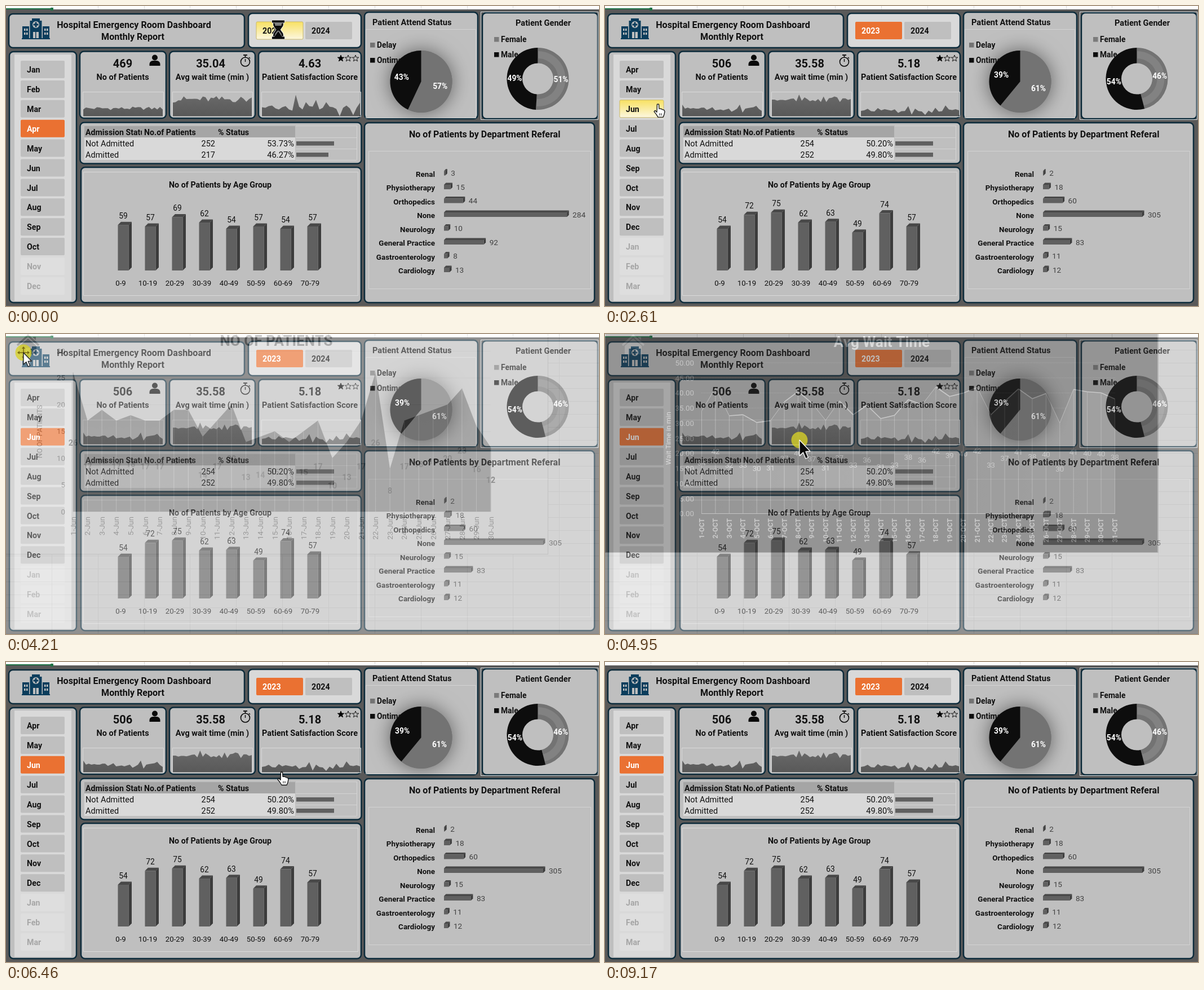
An HTML page with a canvas that plays this animation: 1052x532 px, repeating every 9190 ms.

```html
<!DOCTYPE html>
<html lang="en">
<head>
<meta charset="utf-8">
<title>Hospital dashboard</title>
<style>
html, body { margin: 0; width: 100%; height: 100%; overflow: hidden; background: #fff }
canvas { display: block }
</style>
</head>
<body>
<canvas id="stage" width="1052" height="532"></canvas>
<script>
const W = 1052, H = 532, LOOP = 9190;
const stage = document.getElementById('stage').getContext('2d');
const layer = document.createElement('canvas');
layer.width = W; layer.height = H;
const layerCtx = layer.getContext('2d');
let g = stage;

// ---------- data ----------
const MONTHS = 'Jan Feb Mar Apr May Jun Jul Aug Sep Oct Nov Dec'.split(' ');
const AGES = ['0-9', '10-19', '20-29', '30-39', '40-49', '50-59', '60-69', '70-79'];
const DEPTS = ['Renal', 'Physiotherapy', 'Orthopedics', 'None', 'Neurology', 'General Practice', 'Gastroenterology', 'Cardiology'];

const noise = (i, seed) => { const v = Math.sin(i * 12.9898 + seed * 78.233) * 43758.5453; return v - Math.floor(v); };
const series = (seed, lo, hi, n = 30) => Array.from({ length: n }, (_, i) => lo + (hi - lo) * noise(i, seed));

const octPatients = [15, 14, 15, 18, 19, 15, 15, 10, 19, 12, 20, 18, 20, 11, 10, 14, 11, 25, 17, 22, 18, 16, 14, 13, 15, 18, 10, 15, 18, 16, 20];
const junPatients = [26, 17, 19, 17, 18, 17, 17, 19, 19, 14, 17, 20, 13, 14, 15, 13, 15, 17, 10, 13, 17, 26, 8, 17, 18, 19, 20, 23, 16, 12];
const junWait = [34.6, 34.8, 32.6, 34.2, 34.2, 33.1, 34.7, 36.6, 37.2, 31.3, 45.3, 32.5, 39.5, 36, 31.5, 33.6, 31.6, 35.8, 29.6, 41.2, 29.6, 37.7, 38.5, 41.3, 39.5, 29.7, 37.5, 37.5, 34, 36];
const junScore = [4.75, 5.3, 6.6, 4.5, 4.25, 7.3, 5.2, 6.25, 5.65, 4.95, 6.1, 2.95, 4.45, 4.6, 9, 1.5, 6.75, 4.6, 4.25, 1.3, 4.95, 3.1, 7.45, 4.1, 4.55, 9.6, 6.05, 5.5, 6.25, 5.25];

const bumpy = series(3, 9, 16);
bumpy[11] = 26; bumpy[17] = 18;

const DATA = [
  { kpi: ['469', '35.04', '4.63'], table: [[252, '53.73%', 67], [217, '46.27%', 57]],
    age: [59, 57, 69, 62, 54, 57, 54, 57], dept: [3, 15, 44, 284, 10, 92, 8, 13], deptScale: .768, delay: 57, female: 51,
    sparks: [series(1, 11, 17), series(2, 24, 36),
      [16, 15, 18, 19, 14, 12, 16, 18, 12, 10, 38, 17, 12, 25, 18, 17, 29, 12, 15, 25, 17, 16, 13, 0, 15, 19, 14, 2, 15, 24]] },
  { kpi: ['479', '34.90', '5.30'], table: [[242, '50.52%', 65], [237, '49.48%', 63]],
    age: [70, 67, 64, 60, 42, 53, 71, 52], dept: [4, 11, 45, 263, 11, 115, 12, 18], deptScale: .772, delay: 57, female: 48,
    sparks: [bumpy, series(4, 26, 36),
      [10, 17, 12, 9, 9, 12, 33, 31, 13, 11, 19, 17, 19, 17, 22, 21, 18, 12, 7, 31, 25, 16, 19, 23, 10, 13, 29, 32, 17, 19]] },
  { kpi: ['506', '35.58', '5.18'], table: [[254, '50.20%', 67], [252, '49.80%', 67]],
    age: [54, 72, 75, 62, 63, 49, 74, 57], dept: [2, 18, 60, 305, 15, 83, 11, 12], deptScale: .577, delay: 61, female: 46,
    sparks: [junPatients.map(v => v * .8), junWait.map(v => v * .85), junScore.map(v => v * 2)] }
];

// ---------- drawing helpers ----------
function text(s, x, y, size, { color = '#111', bold = true, align = 'left', turn = 0 } = {}) {
  g.save();
  g.translate(x, y);
  g.rotate(turn);
  g.font = `${bold ? 'bold ' : ''}${size}px Roboto, sans-serif`;
  g.textAlign = align;
  g.fillStyle = color;
  g.fillText(s, 0, size * .36);
  g.restore();
}
function rect(x, y, w, h, color) { g.fillStyle = color; g.fillRect(x, y, w, h); }
function frame(x, y, w, h, color = '#d9d9d9') { g.strokeStyle = color; g.lineWidth = 1; g.strokeRect(x + .5, y + .5, w, h); }
function line(x1, y1, x2, y2, color, width = 1) {
  g.beginPath(); g.moveTo(x1, y1); g.lineTo(x2, y2);
  g.strokeStyle = color; g.lineWidth = width; g.stroke();
}
function poly(points, fill, stroke, width = 1) {
  g.beginPath();
  points.forEach(([x, y]) => g.lineTo(x, y));
  g.closePath();
  if (fill) { g.fillStyle = fill; g.fill(); }
  if (stroke) { g.strokeStyle = stroke; g.lineWidth = width; g.lineJoin = 'round'; g.stroke(); }
}
function round(x, y, w, h, r, fill, stroke, width = 2.5) {
  g.beginPath(); g.roundRect(x, y, w, h, r);
  g.fillStyle = fill; g.fill();
  if (stroke) { g.strokeStyle = stroke; g.lineWidth = width; g.stroke(); }
}
function disc(x, y, r, color) { g.beginPath(); g.arc(x, y, r, 0, 7); g.fillStyle = color; g.fill(); }
const panel = (x1, y1, x2, y2, fill = '#bfbfbf') => round(x1, y1, x2 - x1, y2 - y1, 7, fill, '#0c2b3b');
function gradient(x1, y1, x2, y2, ...colors) {
  const fill = g.createLinearGradient(x1, y1, x2, y2);
  colors.forEach((c, i) => fill.addColorStop(i / (colors.length - 1), c));
  return fill;
}
function plot(values, x1, x2, base, scale) {
  return values.map((v, i) => [x1 + (x2 - x1) * i / (values.length - 1), base - v * scale]);
}
const closed = (pts, base) => [...pts, [pts[pts.length - 1][0], base], [pts[0][0], base]];

// ---------- dashboard ----------
function button(label, x, y, w, { selected, disabled, hover }) {
  const fill = hover ? gradient(0, y, 0, y + 31, '#f8e162', '#fcf7e0')
    : selected ? '#ea7132' : disabled ? '#dedede' : '#bfbfbf';
  round(x, y, w, 31, 2, fill, hover && '#c9b86a', 1);
  text(label, x + 11, y + 16, 14.2, { color: disabled ? '#a6a6a6' : selected && !hover ? '#fff' : '#111' });
}

function hospital() {
  const navy = '#0b3d5c';
  rect(29, 36, 12, 22, navy); rect(65, 36, 12, 22, navy);
  rect(42.5, 26, 21, 32, navy); rect(46, 22, 14, 6, navy);
  rect(28, 57, 50, 2, navy);
  disc(53, 33, 6, '#bfbfbf');
  rect(51.5, 28.5, 3, 9, navy); rect(48.5, 31.5, 9, 3, navy);
  for (const x of [32, 36, 68, 72]) for (const y of [40, 47]) rect(x, y, 2.5, 4, '#bfbfbf');
  rect(48, 46, 10, 11, '#bfbfbf'); rect(52, 46, 1.5, 11, navy);
}

function star(cx, cy, filled) {
  const pts = Array.from({ length: 10 }, (_, i) => {
    const a = i * Math.PI / 5, r = i % 2 ? 2.5 : 6;
    return [cx + r * Math.sin(a), cy - r * Math.cos(a)];
  });
  poly(pts, filled && '#000', '#000', .9);
}

function kpiIcons() {
  disc(264, 91.5, 5, '#0a0a0a');
  round(254.5, 97, 19, 9, [6, 6, 0, 0], '#0a0a0a');
  g.beginPath(); g.arc(424.5, 99, 8, 0, 7);
  g.strokeStyle = '#0a0a0a'; g.lineWidth = 1.6; g.stroke();
  line(424.5, 99, 424.5, 94, '#0a0a0a', 1.4);
  line(421, 87, 428, 87, '#0a0a0a', 1.8);
  line(424.5, 87, 424.5, 91, '#0a0a0a', 1.6);
  line(431, 91, 433, 93, '#0a0a0a', 1.5);
  [594, 607, 620].forEach((x, i) => star(x, 93, !i));
}

function slice(cx, cy, r, from, to, color, inner = 0) {
  const a = from * 2 * Math.PI - Math.PI / 2, b = to * 2 * Math.PI - Math.PI / 2;
  g.beginPath();
  g.arc(cx, cy, r, a, b);
  if (inner) g.arc(cx, cy, inner, b, a, true); else g.lineTo(cx, cy);
  g.closePath();
  g.fillStyle = color; g.fill();
}
function shareLabel(cx, cy, r, at, pct) {
  const a = at * 2 * Math.PI;
  text(pct + '%', cx + r * Math.sin(a), cy - r * Math.cos(a), 13.8, { color: '#fff', align: 'center' });
}
function legend(x, y, color, label) {
  rect(x, y - 4, 8.5, 8.5, color);
  text(label, x + 12, y, 13.8);
}

function pies({ delay, female }) {
  panel(636, 11, 837, 200);
  frame(638, 41, 195, 157, '#d2d2d2');
  text('Patient Attend Status', 650, 29, 14.6);
  legend(646, 69, '#737373', 'Delay');
  legend(646, 96, '#0d0d0d', 'Ontime');
  g.save();
  g.shadowColor = 'rgba(0,0,0,.5)'; g.shadowBlur = 34;
  disc(736.5, 134, 55, '#737373');
  g.restore();
  const d = delay / 100, f = female / 100;
  slice(736.5, 134, 55, 0, d, '#737373');
  slice(736.5, 134, 55, d, 1, '#0d0d0d');
  shareLabel(736, 134, 35, d / 2, delay);
  shareLabel(736, 134, 35, (1 + d) / 2, 100 - delay);

  panel(845, 12, 1050, 200);
  frame(842, 10, 208, 191, '#dfe4e6');
  text('Patient Gender', 904, 30, 14.6);
  legend(866, 59, '#7b7b7b', 'Female');
  legend(866, 86, '#0d0d0d', 'Male');
  slice(943.5, 129, 55, 0, f, '#737373', 27.5);
  slice(943.5, 129, 49, 0, f, '#828282', 36);
  slice(943.5, 129, 55, f, 1, '#0d0d0d', 27.5);
  shareLabel(943.5, 129, 41, f / 2, female);
  shareLabel(943.5, 129, 41, (1 + f) / 2, 100 - female);
}

function block(x, y, w, h, depth) {
  poly([[x, y], [x + depth, y - depth], [x + w + depth, y - depth], [x + w, y]], '#484848');
  poly([[x + w, y], [x + w + depth, y - depth], [x + w + depth, y + h - depth], [x + w, y + h]], '#3c3c3c');
  rect(x, y, w, h, '#606060');
}

function barCharts({ age, dept, deptScale }) {
  panel(133, 286, 630, 526);
  frame(137, 294, 487, 219);
  text('No of Patients by Age Group', 380, 317, 14.3, { align: 'center' });
  age.forEach((v, i) => {
    const x = 198.5 + 48 * i, h = v * 1.37;
    block(x, 469 - h, 19, h, 5.5);
    text(v, x + 9.5, 453 - h, 13.8, { bold: false, align: 'center' });
    text(AGES[i], x + 5, 491, 13.3, { bold: false, align: 'center' });
  });

  panel(636, 207, 1044, 526);
  frame(643, 257, 394, 244, '#d2d2d2');
  text('No of Patients by Department Referal', 715, 227, 16);
  dept.forEach((v, i) => {
    const y = 297.5 + 24.5 * i, w = v * deptScale;
    block(777, y - 5, w, 8, 3.5);
    text(DEPTS[i], 761, y + .5, 13.4, { align: 'right' });
    text(v, 787 + w, y - 1, 13.6, { bold: false, color: '#404040' });
  });
}

function sparkline(heights, x, w) {
  poly(closed(plot(heights, x, x + w, 195.5, 1), 195.5), gradient(0, 165, 0, 196, '#666', '#585858'));
  frame(x - 1, 152, w + 2, 44, '#dadada');
}

function admissions(table) {
  panel(131.5, 206.5, 630.5, 279.5);
  rect(139, 233, 374, 40, '#d9d9d9');
  rect(139, 213, 374, 20, '#a5a5a5');
  g.save();
  g.beginPath(); g.rect(139, 210, 102, 26); g.clip();
  text('Admission Status', 141, 224, 14.2);
  g.restore();
  text('No.of Patients', 245, 224, 14.2);
  text('% Status', 376, 224, 14.2);
  for (const y of [212, 233, 253, 273]) line(514, y + .5, 622, y + .5, '#d4d4d4');
  line(622.5, 212, 622.5, 273, '#d4d4d4');
  table.forEach(([count, pct, width], i) => {
    const y = 244 + 20 * i;
    text(i ? 'Admitted' : 'Not Admitted', 141, y, 14.5, { bold: false });
    text(count, 371, y, 14.5, { bold: false, align: 'right' });
    text(pct, 511, y, 14.7, { bold: false, align: 'right' });
    rect(515, y - 4, width, 7.5, '#606060');
  });
}

function dashboard(t, pointer) {
  const numbers = DATA[t < 200 ? 0 : t < 2160 ? 1 : 2];
  const charts = DATA[t < 470 ? 0 : t < 2340 ? 1 : 2];
  const over = (x, y, w) => pointer && pointer.x >= x && pointer.x <= x + w && pointer.y >= y && pointer.y <= y + 32;

  rect(0, 0, W, H, '#595959');
  rect(0, 0, W, 6, '#fff');
  for (let i = 1; i <= 12; i++) line(Math.round(i * 81.85) - .5, 0, Math.round(i * 81.85) - .5, 6, '#dcdcdc');
  if (t < 9170) { rect(0, 4, 82, 2, '#1e7145'); rect(79, 3, 5, 5, '#1e7145'); }

  panel(5, 14, 423, 74);
  hospital();
  text('Hospital Emergency Room Dashboard', 227, 33, 16.1, { align: 'center' });
  text('Monthly Report', 225, 54, 16.1, { align: 'center' });

  panel(430, 13, 630, 74, '#d9d9d9');
  button('2023', 444, 28, 83, { selected: true, hover: over(444, 28, 83) });
  button('2024', 531, 28, 83, {});

  panel(6, 81, 125, 526);
  rect(15, 86, 101, 437, '#d9d9d9');
  const shift = t < 200 ? 0 : 3, active = t < 200 ? 10 : 9, month = t < 1220 ? 'Apr' : 'Jun';
  for (let i = 0; i < 12; i++) {
    const name = MONTHS[(i + shift) % 12], y = 97 + 34.9 * i;
    button(name, 26, y, 78, { selected: name === month, disabled: i >= active, hover: over(26, y, 78) });
  }

  const tiles = [[131, 284, 'No of Patients'], [290, 442, 'Avg wait time (min )'], [448, 630, 'Patient Satisfaction Score']];
  tiles.forEach(([x1, x2, label], i) => {
    panel(x1, 80.5, x2, 199);
    const mid = [207, 364, 539][i];
    text(numbers.kpi[i], mid - (i === 1), 102, 20, { align: 'center' });
    text(label, mid + (i === 1 ? 2 : 0), 126, 14.5, { align: 'center' });
    sparkline(charts.sparks[i], x1 + 6, x2 - x1 - (i > 1 ? 8 : 12));
  });
  kpiIcons();
  admissions(numbers.table);
  pies(charts);
  barCharts(charts);
}

// ---------- detail sheets ----------
function house(cx, color, hole) {
  rect(cx + 9, 5, 5, 10, color);
  poly([[cx, 7], [cx + 15, 21], [cx + 15, 36], [cx - 15, 36], [cx - 15, 21]], color);
  g.beginPath(); g.moveTo(cx - 19, 20); g.lineTo(cx, 3); g.lineTo(cx + 19, 20);
  g.strokeStyle = hole; g.lineWidth = 7; g.stroke();
  g.strokeStyle = color; g.lineWidth = 3.6; g.stroke();
  rect(cx - 4, 25, 8, 11, hole);
}

function cells() {
  rect(0, 0, W, H, '#fff');
  for (let i = 1; i <= 12; i++) line(Math.round(i * 81.85) - .5, 0, Math.round(i * 81.85) - .5, H, '#e1e1e1');
  for (let k = 0; k < 24; k++) line(0, Math.round(5 + 22.85 * k) + .5, W, Math.round(5 + 22.85 * k) + .5, '#e1e1e1');
}

function dayLabels(pts, suffix, y, size, style) {
  pts.forEach(([x], i) => text(`${i + 1}-${suffix}`, x, y, size, { ...style, align: 'right', turn: -Math.PI / 2 }));
}
function dropLines(pts, base, color) { pts.forEach(([x, y]) => line(x, y, x, base, color)); }

function patientsSheet(t) {
  const stale = t < 3460, values = stale ? octPatients : junPatients;
  rect(0, 0, 961, 390, '#fff');
  line(961.5, 0, 961.5, 391, '#c8c8c8'); line(0, 390.5, 962, 390.5, '#c8c8c8');
  house(39, '#7f7f7f', '#fff');
  text('NO OF PATIENTS', 479.5, 12, 26, { color: '#505050', align: 'center' });
  text('NO OF PATIENTS', 60, 173, 12.4, { color: '#505050', bold: false, align: 'center', turn: -Math.PI / 2 });
  for (let v = 0; v <= 30; v += 5) {
    const y = 315 - v * 9.5;
    line(119, y + .5, 860, y + .5, '#ebebeb');
    text(v, 105, y, 13.3, { color: '#505050', bold: false, align: 'right' });
  }
  const pts = plot(values, 119, 860, 315, 9.5);
  poly(closed(pts, 315), gradient(0, 80, 0, 315, '#6a6a6a', '#777', '#797979'));
  dropLines(pts, 315, '#b5b5b5');
  pts.forEach(([x, y], i) => text(values[i], x, (y + 315) / 2 + 1, 14.2, { color: '#2c2c2c', align: 'center' }));
  dayLabels(pts, stale ? 'Oct' : 'Jun', 324, 13.3, { color: '#505050', bold: false });
}

function waitSheet(t) {
  const stale = t < 5320, values = stale ? series(8, 30, 42, 31) : junWait;
  rect(0, 0, 982, 388, '#a6a6a6');
  rect(1, 0, 979, 387, '#404040');
  house(50, '#7f7f7f', '#404040');
  text('Avg Wait Time', 491, 14, 26.2, { color: '#dedede', align: 'center' });
  text('Wait Time in min', 112, 185, 12.6, { color: '#d9d9d9', bold: false, align: 'center', turn: -Math.PI / 2 });
  g.setLineDash([1, 1.5]);
  for (let v = 5; v <= 50; v += 5) line(171, 318.5 - v * 5.35, 905, 318.5 - v * 5.35, '#808080');
  g.setLineDash([]);
  for (let v = 0; v <= 50; v += 5) text(v.toFixed(2), 158, 318.5 - v * 5.35, 13.3, { color: '#d0d0d0', bold: false, align: 'right' });
  const pts = plot(values, 171.5, 904.5, 318.5, 5.35);
  poly(closed(pts, 318.5), gradient(171, 0, 905, 0, '#454545', '#575757', '#646464'));
  dropLines(pts, 318.5, '#a8a8a8');
  pts.slice(1).forEach(([x, y], i) => {
    const [px, py] = pts[i];
    line(px, py, x, y, '#dcdcdc', Math.abs(y - py) > 30 ? .8 : 1.6);
  });
  line(171, 318.5, 905, 318.5, '#cfcfcf', 1.2);
  pts.forEach(([x, y], i) => text(Math.round(values[i]), x, (y + 318.5) / 2 + 1, 13.2, { color: '#e0e0e0', bold: false, align: 'center' }));
  dayLabels(pts, stale ? 'OCT' : 'JUN', 327, 12.3, { color: '#dedede' });
}

function scoreSheet(t) {
  const stale = t < 7310, values = stale ? series(9, 2, 8, 31) : junScore;
  const glow = g.createRadialGradient(0, 0, 0, 0, 0, 1);
  glow.addColorStop(0, '#fff'); glow.addColorStop(.3, '#fbfbfb'); glow.addColorStop(1, '#bebebe');
  g.save();
  g.beginPath(); g.rect(0, 0, 983, 401); g.clip();
  g.translate(510, 60); g.scale(580, 470);
  rect(-1, -1, 2, 2, glow);
  g.restore();
  line(982.5, 0, 982.5, 402, '#b0b0b0'); line(0, 401.5, 983, 401.5, '#b0b0b0');
  house(45, '#7f7f7f', '#dcdcdc');
  text('Avg satisfaction Score', 490.5, 12, 26, { color: '#3b3b3b', align: 'center' });
  text('Satisfactiom score', 105, 192, 13, { color: '#3b3b3b', align: 'center', turn: -Math.PI / 2 });
  const pts = plot(values, 165, 902, 330, 22.85);
  for (let v = 0; v <= 12; v += 2) {
    const y = 330 - v * 22.85, shade = 130 + v * 7;
    line(165, y, 902, y, `rgb(${shade},${shade},${shade})`);
    text(v.toFixed(2), 152, y, 13.3, { color: '#3b3b3b', bold: false, align: 'right' });
  }
  poly(closed(pts, 330), 'rgba(122,122,122,.92)', '#d5d5d5', .8);
  line(165, 330, 902, 330, '#404040', 2.5);
  dayLabels(pts, stale ? 'OCT' : 'JUN', 340, 11.8, { color: '#3b3b3b', bold: false });
}

// ---------- pointers ----------
const POINTERS = {
  wait(x, y) {
    const bulb = s => [[x - 8, y + 13 * s], [x + 8, y + 13 * s], [x + 7, y + 7 * s], [x + 2, y], [x - 2, y], [x - 7, y + 7 * s]];
    for (const s of [1, -1]) poly(bulb(s), null, '#fff', 4.5);
    for (const s of [1, -1]) {
      poly(bulb(s), '#7d7d7d', '#0a0a0a', 2.8);
      round(x - 11.5, y + 14.5 * s - 2.5, 23, 5, 1, '#0a0a0a', '#fff', .8);
    }
    poly([[x - 6, y - 7], [x + 6, y - 7], [x, y]], '#0a0a0a');
    poly([[x - 7, y + 13], [x + 7, y + 13], [x, y + 3]], '#0a0a0a');
  },
  hand(x, y) {
    const shape = [[-1.5, 0], [1.5, 0], [2, 8], [5, 8], [8, 9.5], [11, 10.5], [12, 13], [11, 18], [9, 23], [0, 23], [-3, 18], [-7, 13], [-5, 11], [-2, 14]];
    poly(shape.map(([a, b]) => [x + a, y + b]), '#fff', '#111', 1.3);
    for (const a of [3, 6]) line(x + a, y + 16, x + a, y + 20, '#111');
  },
  arrow(x, y, fill = '#0a0a0a', edge = '#fff', k = 1) {
    const shape = [[0, 0], [0, 28], [6.5, 22], [11, 33], [15.5, 31], [11, 20.5], [19, 20]];
    poly(shape.map(([a, b]) => [x + a * k, y + b * k]), fill, edge, 1.3);
  },
  move(x, y) {
    line(x - 9, y, x + 9, y, '#7a6a10', 1.5); line(x, y - 9, x, y + 9, '#7a6a10', 1.5);
    for (const [a, b] of [[1, 0], [-1, 0], [0, 1], [0, -1]])
      poly([[x + 11 * a, y + 11 * b], [x + 7 * a + 3 * b, y + 7 * b + 3 * a], [x + 7 * a - 3 * b, y + 7 * b - 3 * a]], '#7a6a10');
    POINTERS.arrow(x, y, '#fff', '#222', .75);
  }
};

// [start, last step, steps, x, y, pointer, clicking]
const PATH = [
  [0, 0, 1, 483, 42, 'wait'], [100, 100, 1, 478, 32, 'hand'],
  [470, 830, 5, 66, 112, 'hand'], [1030, 1120, 2, 64, 170, 'hand'], [1220, 1220, 1, 64, 170, 'wait'],
  [2040, 2040, 1, 62, 172, 'hand'], [2610, 2990, 5, 222, 183, 'hand'],
  [3270, 3270, 1, 222, 183, 'arrow', 1], [3460, 3460, 1, 222, 183, 'arrow'],
  [3640, 4020, 5, 31, 33, 'hand'], [4120, 4120, 1, 31, 33, 'move', 1], [4310, 4310, 1, 31, 33, 'move'],
  [4500, 4790, 4, 345, 188, 'hand'], [4950, 4950, 1, 345, 188, 'arrow', 1], [5140, 5140, 1, 345, 188, 'arrow'],
  [5320, 5690, 5, 59, 31, 'hand'], [5920, 5920, 1, 59, 31, 'hand', 1], [6000, 6000, 1, 59, 31, 'hand'],
  [6190, 6280, 2, 486, 193, 'hand'], [6460, 6730, 4, 498, 202, 'hand'],
  [6920, 6920, 1, 498, 202, 'arrow', 1], [7120, 7120, 1, 498, 202, 'arrow'], [7310, 7310, 1, 498, 202, ''],
  [7470, 7660, 3, 45, 20, 'hand'], [7850, 7850, 1, 45, 20, 'hand', 1], [8035, 8035, 1, 45, 20, 'arrow'],
  [8130, 8320, 3, 858, 71, 'arrow'], [8520, 8520, 1, 1028, 494, ''],
  [8690, 8690, 1, 1028, 494, 'arrow'], [8870, 8870, 1, 1028, 494, '']
];
// [time, sheet, opacity]
const VIEWS = [
  [0, null, 0], [3270, patientsSheet, .5], [3380, patientsSheet, 1], [4120, patientsSheet, .67], [4210, patientsSheet, .33], [4310, null, 0],
  [4950, waitSheet, .33], [5045, waitSheet, .67], [5140, waitSheet, 1], [5920, waitSheet, .5], [6000, null, 0],
  [6920, scoreSheet, .33], [7020, scoreSheet, .67], [7120, scoreSheet, 1], [7850, scoreSheet, .67], [7945, scoreSheet, .33], [8035, null, 0]
];

function pointerAt(t) {
  const i = PATH.findLastIndex(p => p[0] <= t);
  const [start, last, steps, x, y, kind, click] = PATH[i];
  const [, , , px, py] = PATH[Math.max(0, i - 1)];
  const step = steps < 2 ? 1 : Math.floor((t - start) / (last - start) * (steps - 1) + .01) + 1;
  const p = Math.min(1, step / steps);
  return { x: px + (x - px) * p, y: py + (y - py) * p, kind, click };
}

function draw(t) {
  const pointer = pointerAt(t);
  const [, sheet, opacity] = VIEWS[VIEWS.findLastIndex(v => v[0] <= t)];
  g = stage;
  if (opacity < 1) dashboard(t, sheet ? null : pointer);
  if (sheet) {
    g = layerCtx;
    cells();
    sheet(t);
    g = stage;
    g.globalAlpha = opacity;
    g.drawImage(layer, 0, 0);
    g.globalAlpha = 1;
  }
  if (pointer.click) disc(pointer.x, pointer.y, 14.5, 'rgba(214,208,40,.8)');
  if (pointer.kind) POINTERS[pointer.kind](pointer.x, pointer.y);
}

const begin = performance.now();
(function tick() {
  draw((performance.now() - begin) % LOOP);
  requestAnimationFrame(tick);
})();
</script>
</body>
</html>
```
